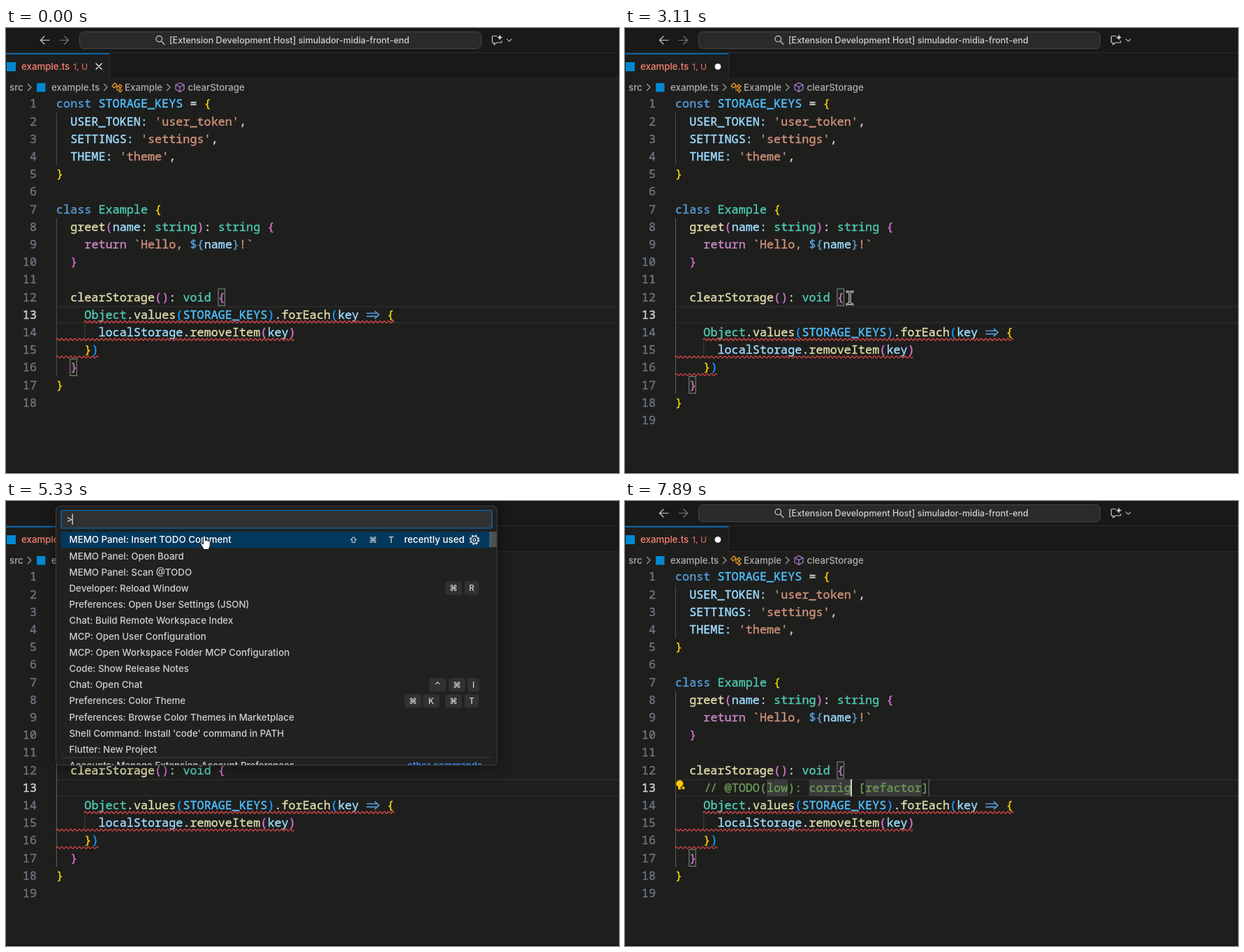
These frames come from a looping animation (878x638 px, 8 s). An HTML page:

```html
<!DOCTYPE html>
<html lang="en">
<head>
<meta charset="utf-8">
<title>Editor demo</title>
<style>
html, body { margin: 0; width: 100%; height: 100%; overflow: hidden; background: #1e1e1d; }
svg { display: block; width: 878px; height: 638px; }
text { font: 500 13.3px Inter, "Open Sans", sans-serif; white-space: pre; }
.code text {
  font: 500 16.8px "Noto Sans Mono", "DejaVu Sans Mono", monospace; font-variant-ligatures: none;
  fill: currentColor; stroke: currentColor; stroke-width: .4px;
}
.key { font: 500 11.5px Inter, "DejaVu Sans", sans-serif; fill: #ddd; text-anchor: middle; }
.line { fill: none; stroke-linecap: round; stroke-linejoin: round; }
</style>
</head>
<body>
<svg viewBox="0 0 878 638">
  <rect width="878" height="638" fill="#1e1e1d"/>
  <g id="chrome">
    <rect width="878" height="72" fill="#191919"/>
    <path d="M0 35.5H878M148.5 72.5H878" stroke="#2b2b2b"/>
    <rect y="36" width="148" height="37" fill="#1e1e1d"/>
    <path d="M148.5 36V73" stroke="#2b2b2b"/>
    <path d="M0 37H148" stroke="#0078d4" stroke-width="1.4"/>
    <path d="M0 637H878" stroke="#171717" stroke-width="2"/>
  </g>
  <g id="titlebar" class="line" stroke="#ccc" stroke-width="1.2">
    <path d="M62 17.5H49.5M55 12L49.5 17.5L55 23"/>
    <path d="M77 17.5H89.5M84 12L89.5 17.5L84 23" stroke="#777"/>
    <rect x="105.5" y="5.5" width="575" height="24" rx="6" fill="#2a2a2a" stroke="#474747" stroke-width="1"/>
    <circle cx="219.3" cy="15.6" r="4.3"/><path d="M222.5 19L227 23.5"/>
    <path d="M703 11.5H697.5Q696.5 11.5 696.5 12.5V20Q696.5 21 697.5 21H699V24L702.5 21H709Q710 21 710 20V18.5"/>
    <path d="M707.3 9Q707.8 13 711.8 13.5Q707.8 14 707.3 18Q706.8 14 702.8 13.5Q706.8 13 707.3 9Z" fill="#ccc" stroke="none"/>
    <path d="M717.5 16L720.7 19.2L724 16" stroke="#aaa"/>
    <text x="234" y="22" fill="#d0d0d0" stroke="none" style="font-size:12.5px">[Extension Development Host] simulador-midia-front-end</text>
  </g>
  <g id="tab">
    <rect x="1" y="49" width="13" height="13" fill="#0288d1"/>
    <text x="22" y="60" fill="#f88070">example.ts</text>
    <text x="96" y="60" fill="#c9635b" style="font-size:12.3px">1, U</text>
    <path id="close" class="line" d="M129 51L137 59M137 51L129 59" stroke="#eee" stroke-width="1.4"/>
    <circle id="dirty" cx="133" cy="55.3" r="4.4" fill="#fff"/>
  </g>
  <g id="crumbs" fill="#adadad">
    <rect x="44" y="79" width="12.5" height="12.5" fill="#0288d1"/>
    <text x="5" y="90">src</text><text x="65" y="90">example.ts</text>
    <text x="170" y="90">Example</text><text x="260.5" y="90">clearStorage</text>
    <g class="line" stroke="#a0a0a0" stroke-width="1.2">
      <path d="M31.5 80.5L36 85L31.5 89.5M140.5 80.5L145 85L140.5 89.5M230.5 80.5L235 85L230.5 89.5"/>
      <path d="M152 83L156 79L159 82L155 86ZM157 84H161M159 84V89H161M161 83L163 81L166 83.5L163.5 86ZM161 89L163 87L166 89.5L163.5 92Z" stroke="#ee9d28"/>
      <path d="M249 78.5L255 81.5V88L249 91.5L243 88V81.5ZM243 81.5L249 84.5L255 81.5M249 84.5V91.5" stroke="#b180d7"/>
    </g>
  </g>
  <path d="M72 399.5H878M72 422.7H878" stroke="#2a2a2a" stroke-width="1.8"/>
  <g id="guides" stroke="#4c4c4c">
    <path d="M72.5 121.3V197"/><path id="body"/>
  </g>
  <g id="numbers" class="code" text-anchor="end"></g>
  <g id="marks" fill="#00640019" stroke="#888">
    <rect x="304" y="374" width="9.5" height="24"/><rect id="mate" x="91.8" y="474.5" width="9.5" height="24"/>
  </g>
  <g id="head" class="code"></g>
  <g id="tail" class="code"></g>
  <g id="snippet" class="code" color="#6a9955">
    <rect id="low" x="203" y="399" width="30.3" height="24.4"/>
    <rect id="word" x="263.5" y="399" height="24.4"/>
    <text x="113.5" y="416.8" letter-spacing="-1.5">//</text>
    <text x="142.6" y="416.8">@TODO(low):</text>
    <text id="desc" x="263.5" y="416.8"></text>
    <g id="end">
      <rect x="394.6" y="399" width="80.6" height="24.4" fill="#3b3b3b"/>
      <text x="384.5" y="416.8">[refactor]</text>
      <path d="M485.6 399V423.5" stroke="#777"/>
    </g>
    <path id="caret" d="M0 399V423.5" stroke="#d8d8d8" stroke-width="2"/>
    <g id="bulb" fill="#fc0">
      <circle cx="78.3" cy="405.3" r="5"/><rect x="76" y="409" width="4.6" height="4.6" rx="1"/>
      <path d="M83.5 406.5Q84 411 88 411.3Q84 411.6 83.5 416Q83 411.6 79 411.3Q83 411 83.5 406.5Z" stroke="#1e1e1d" stroke-width=".8"/>
    </g>
  </g>
  <g id="choices" class="code">
    <rect x="233.5" y="424" width="453" height="79" rx="3" fill="#202020" stroke="#454545"/>
    <rect x="234" y="424.5" width="452" height="25.4" fill="#04395e"/>
  </g>
  <g id="palette">
    <rect x="71.5" y="7" width="632" height="372" rx="6" fill="#212120" stroke="#3f3f3f" style="filter:drop-shadow(0 0 8px #0008)"/>
    <rect x="79" y="13.5" width="617" height="25.5" rx="2" fill="#313131" stroke="#0078d4" stroke-width="1.2"/>
    <text x="86.5" y="31" fill="#d0d0d0">&gt;</text><path d="M95.2 18.5V34" stroke="#ddd" stroke-width="1.3"/>
    <rect id="hover" x="79" width="617" height="23.1" fill="#04395e"/>
    <clipPath id="clip"><rect x="72" y="40" width="631" height="338.5"/></clipPath>
    <g id="rows" clip-path="url(#clip)"></g>
    <rect x="692" y="44" width="10.5" height="22" fill="#79797988"/>
    <path d="M80 368H694" stroke="#3f3f3f"/>
    <g id="gear" class="line" stroke="#ddd" stroke-width="1.2">
      <circle cx="671" r="6.3" stroke-width="2" stroke-dasharray="2.6 2.35" style="stroke-linecap:butt"/>
      <circle cx="671" r="5"/><circle cx="671" r="1.9"/>
    </g>
  </g>
  <g id="pointer">
    <path id="arrow" d="M0 0V17L4 13.2L6.6 19.6L9.3 18.4L6.7 12.2H12Z" fill="#000" stroke="#fff" stroke-width="1.2"/>
    <g id="beam" class="line">
      <path d="M-4 -9Q0 -9 0 -6V6Q0 9 -4 9M4 -9Q0 -9 0 -6M0 6Q0 9 4 9" stroke="#eee" stroke-width="3.2"/>
      <path d="M-4 -9Q0 -9 0 -6V6Q0 9 -4 9M4 -9Q0 -9 0 -6M0 6Q0 9 4 9" stroke="#111" stroke-width="1.2"/>
    </g>
    <path id="hand" transform="translate(-6 -9)" d="M4.4 2.7C4.4 .6 7.6 .6 7.6 2.7V8C7.9 6.8 10 7 10.1 8.3C10.5 7.4 12.3 7.7 12.4 8.9C12.9 8.1 14.3 8.5 14.3 9.8V14C14.3 17 12.8 17.5 12.4 20.5H5C4.5 18 2 15 .5 12C-.1 10.6 1.8 10 2.8 11.4L4.4 13Z" fill="#fff" stroke="#111" stroke-width="1"/>
  </g>
</svg>
<script>
const CELL = 10.08, ROW = 25.2, LEFT = 72, BASE = 114.4, LOOP = 8000, TICK = 111.11;
const $ = id => document.getElementById(id);
const COLORS = {
  k: '#569cd6', c: '#4fc1ff', y: '#ffd700', p: '#da70d6', b: '#179fff', v: '#9cdcfe',
  s: '#ce9178', t: '#4ec9b0', f: '#dcdcaa', r: '#c586c0', w: '#d4d4d4'
};

function add(parent, tag, attrs, text) {
  const el = document.createElementNS('http://www.w3.org/2000/svg', tag);
  for (const name in attrs) el.setAttribute(name, attrs[name]);
  if (text) el.textContent = text;
  return parent.appendChild(el);
}

const show = (id, on) => { $(id).style.display = on ? '' : 'none'; };
const set = (id, name, value) => $(id).setAttribute(name, value);
const shift = (id, x, y) => set(id, 'transform', `translate(${x} ${y})`);

// Each token begins with its colour key.
function codeLine(parent, source, row) {
  let col = 0;
  for (const token of source.split('|')) {
    const text = token.slice(1), lead = text.length - text.trimStart().length;
    if (text.trim()) {
      add(parent, 'text', { x: LEFT + (col + lead) * CELL, y: BASE + row * ROW, color: COLORS[token[0]] }, text.trim());
    }
    col += text.length;
  }
}

function squiggle(from, to, row) {
  const y = 108.7 + row * ROW + 10.3;
  let d = `M${from} ${y}`;
  for (let x = from, up = 1; x < to; x += 3.15, up = -up) d += `q1.57 ${-3 * up} 3.15 0`;
  add($('tail'), 'path', { d, class: 'line', stroke: '#f14c4c', 'stroke-width': 1.2 });
}

const headLines = [
  'kconst |cSTORAGE_KEYS|w = |y{',
  "w  |vUSER_TOKEN: |s'user_token'|w,",
  "w  |vSETTINGS: |s'settings'|w,",
  "w  |vTHEME: |s'theme'|w,",
  'y}', '',
  'kclass |tExample |y{',
  'w  |fgreet|p(|vname|w: |tstring|p)|w: |tstring |p{',
  'w    |rreturn |s`Hello, |k${|vname|k}|s!`',
  'w  |p}', '',
  'w  |fclearStorage|p()|w: |tvoid |p{'
];
const tailLines = [
  'w    |tObject|w.|fvalues|b(|cSTORAGE_KEYS|b)|w.|fforEach|b(|vkey |k   |y{',
  'w      |vlocalStorage|w.|fremoveItem|p(|vkey|p)',
  'w    |y}|b)',
  'w  |p}',
  'y}'
];
headLines.forEach((line, i) => codeLine($('head'), line, i));
tailLines.forEach((line, i) => codeLine($('tail'), line, i + 12));
add($('tail'), 'path', { d: 'M517 409H532M517 413.4H532M528.5 406L534.3 411.2L528.5 416.4', class: 'line', stroke: COLORS.k, 'stroke-width': 1.6 });
add($('tail'), 'path', { d: 'M112.8 424V449', stroke: '#404040' });
squiggle(112, 553, 12);
squiggle(72, 412, 13);
squiggle(72, 131, 14);

const numbers = Array.from({ length: 19 }, (_, i) =>
  add($('numbers'), 'text', { x: 44, y: BASE + i * ROW, color: i === 12 ? '#d4d4d4' : '#6e7681' }, String(i + 1)));

['low', 'medium', 'high'].forEach((word, i) => {
  const y = 437.2 + i * ROW, g = $('choices');
  add(g, 'text', { x: 257.3, y: y + 5.8, color: i ? '#ccc' : '#2aaaff', style: i ? '' : 'font-weight:700' }, word);
  add(g, 'path', {
    d: `M242.5 ${y - 1}V${y - 5}H251V${y + 2}H247M245 ${y - 2.5}H248.5M238.5 ${y - 1}H246.5V${y + 5}H238.5ZM240.5 ${y + 2}H244.5`,
    class: 'line', stroke: i ? '#ee9d28' : '#eee', 'stroke-width': 1.2
  });
});

const commands = [
  'MEMO Panel: Insert TODO Comment', 'MEMO Panel: Open Board', 'MEMO Panel: Scan @TODO',
  'Developer: Reload Window', 'Preferences: Open User Settings (JSON)',
  'Chat: Build Remote Workspace Index', 'MCP: Open User Configuration',
  'MCP: Open Workspace Folder MCP Configuration', 'Code: Show Release Notes', 'Chat: Open Chat',
  'Preferences: Color Theme', 'Preferences: Browse Color Themes in Marketplace',
  "Shell Command: Install 'code' command in PATH", 'Flutter: New Project',
  'Accounts: Manage Extension Account Preferences'
];
const shortcuts = {
  0: [['⇧', 523], ['⌘', 551], ['T', 577]],
  3: [['⌘', 641], ['R', 667]],
  9: [['⌃', 618], ['⌘', 646], ['I', 669.5]],
  10: [['⌘', 583], ['K', 609], ['⌘', 641], ['T', 667]]
};
const STEP = 23.1, rowY = i => 55.7 + i * STEP;
const extras = commands.map((name, i) => {
  const y = rowY(i);
  const label = add($('rows'), 'text', { x: 90.5, y: y + 4.7 }, name);
  const side = add($('rows'), 'g', {});
  const caps = add(side, 'g', { fill: '#8080802b', stroke: '#33333399' });
  for (const [key, x] of shortcuts[i] || []) {
    const w = key === 'I' ? 16 : key === 'T' || key === 'R' ? 20 : 23;
    add(caps, 'rect', { x: x - w / 2, y: y - 9.3, width: w, height: 18.6, rx: 3 });
    add(side, 'text', { x, y: y + 4.1, class: 'key' }, key);
  }
  const note = { 0: 'recently used', 14: 'other commands' }[i];
  const noteText = add(side, 'text', { x: 682, y: y + 4.7, 'text-anchor': 'end' }, note);
  return { label, side, caps, noteText };
});

// Pointer legs: start, end, from, to.
const legs = [
  [1110, 1780, 400, 545, 338, 412],
  [1890, 2330, 338, 412, 322, 387],
  [3780, 4220, 322, 387, 284, 58]
];
function pointerAt(t) {
  const leg = legs.filter(l => t >= l[0]).pop();
  if (!leg || t >= 6440 || (t >= 3330 && t < 3780)) return null;
  const [start, end, x0, y0, x1, y1] = leg;
  const p = Math.min(1, (t - start) / (end - start)), e = 1 - (1 - p) ** 2;
  return { x: x0 + (x1 - x0) * e, y: y0 + (y1 - y0) * e };
}

function drawPalette(t, mouse) {
  const open = t >= 3330 && t < 5440;
  show('palette', open);
  show('titlebar', !open);
  const over = mouse && mouse.y < 367;
  const row = over ? Math.max(0, Math.floor((mouse.y - 44) / STEP)) : 1;
  set('hover', 'y', 44.2 + row * STEP);
  shift('gear', 0, rowY(row));
  extras.forEach(({ label, side, caps, noteText }, i) => {
    const active = i === row;
    side.setAttribute('transform', `translate(${active ? -25.3 : 0} 0)`);
    label.setAttribute('fill', active ? '#fff' : '#d0d0d0');
    caps.style.opacity = active ? 0 : 1;
    noteText.setAttribute('fill', active ? '#fff' : '#3794ff');
  });
}

function drawSnippet(t) {
  const on = t >= 5440, choosing = t < 6440, selected = t >= 6780 && t < 7440;
  show('snippet', on);
  show('choices', on && choosing);
  show('bulb', t >= 5880);
  const typed = [7440, 7560, 7670, 7780, 7890].filter(at => t >= at).length;
  const word = typed ? 'corrig'.slice(0, [1, 2, 3, 5, 6][typed - 1]) : 'description';
  const width = word.length * CELL;
  $('desc').textContent = word;
  set('low', 'fill', choosing ? '#405c79' : '#3b3b3b');
  set('word', 'fill', selected ? '#405c79' : '#3b3b3b');
  set('word', 'width', width);
  shift('end', width - 11 * CELL, 0);
  shift('caret', t < 6780 ? 233.3 : 263.5 + width, 0);
  show('caret', !(selected && t >= 7110));
  show('marks', t < 3330 || (on && !choosing && !selected));
}

function render(time) {
  const t = Math.floor((time + 5) / TICK) * TICK + 5;
  const added = t >= 2560, drop = added ? ROW : 0, mouse = pointerAt(t);
  show('close', !added);
  show('dirty', added);
  numbers[18].style.display = added ? '' : 'none';
  shift('tail', 0, drop);
  shift('mate', 0, drop);
  set('body', 'd', `M72.5 272.5V${499.4 + drop}`);
  set('body', 'stroke', added ? '#5c5c5c' : '#4c4c4c');
  drawPalette(t, mouse);
  drawSnippet(t);
  show('pointer', mouse);
  if (mouse) {
    shift('pointer', mouse.x, mouse.y);
    const hand = t >= 3780 && mouse.y < 379, beam = t >= 2110 && t < 3330;
    show('hand', hand);
    show('beam', beam);
    show('arrow', !hand && !beam);
  }
}

const start = performance.now();
function loop() {
  render((performance.now() - start) % LOOP);
  requestAnimationFrame(loop);
}
loop();
</script>
</body>
</html>
```
